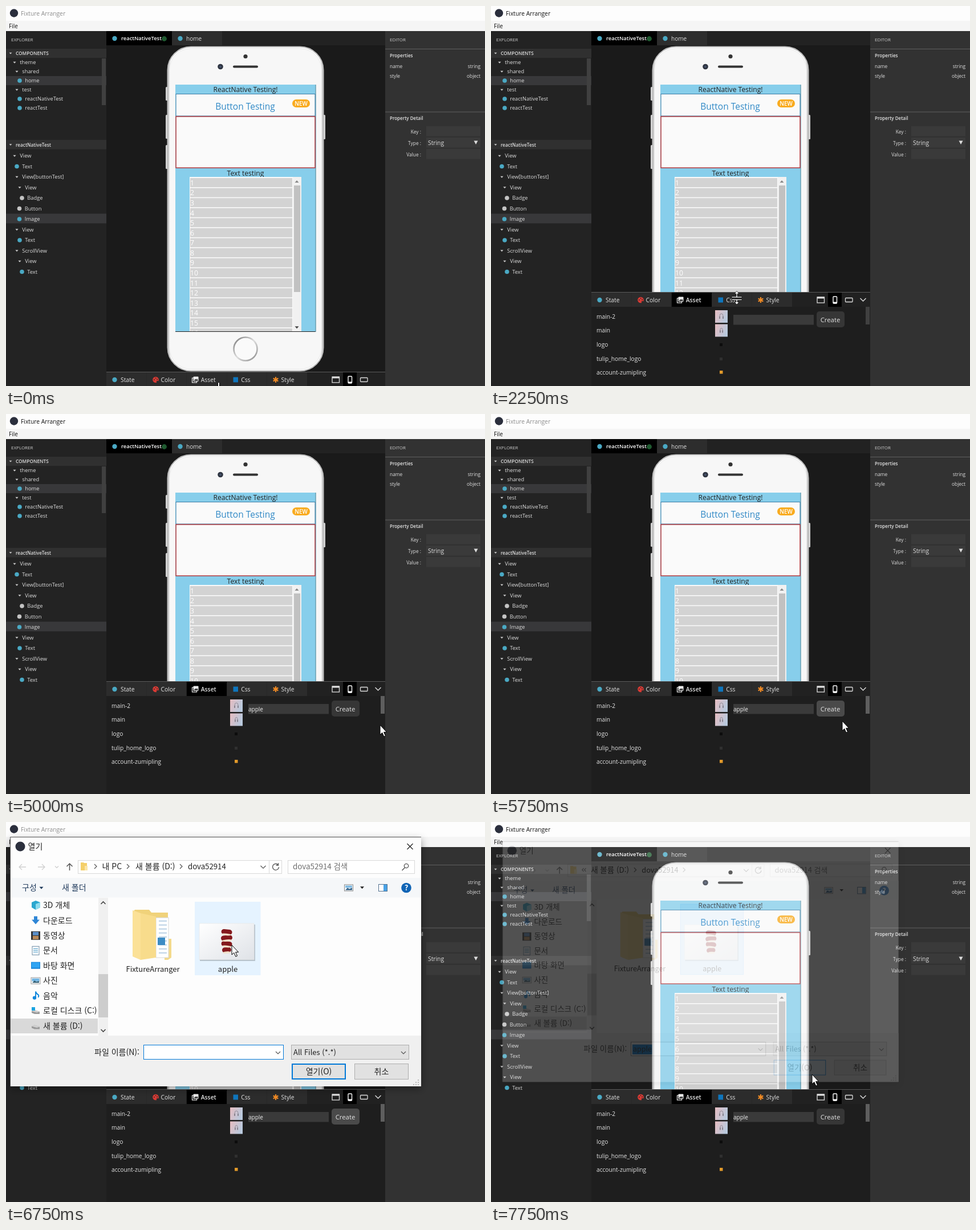
These frames come from a looping animation (840x667 px, 8000 ms). An HTML page:

```html
<!DOCTYPE html>
<html lang="ko">
<head>
<meta charset="utf-8">
<title>Fixture Arranger</title>
<style>
html, body { margin: 0; width: 100%; height: 100%; overflow: hidden; background: #1a1a1a; }
svg { display: block; width: 840px; height: 667px; font-family: "Open Sans", "Noto Sans", sans-serif; }
#dialog { font-family: "Noto Sans CJK KR", "Noto Sans CJK JP", "Noto Sans CJK", sans-serif; }
text { white-space: pre; }
</style>
</head>
<body>
<svg id="stage" viewBox="0 0 840 667"></svg>
<script>
const STEP = 250, STEPS = 32;

const rect = (x, y, w, h, fill, more = '') =>
  `<rect x="${x}" y="${y}" width="${w}" height="${h}" fill="${fill}" ${more}/>`;
const dot = (x, y, r, fill, more = '') => `<circle cx="${x}" cy="${y}" r="${r}" fill="${fill}" ${more}/>`;
const path = (d, fill, more = '') => `<path d="${d}" fill="${fill}" ${more}/>`;
const line = (d, stroke, w = 1, more = '') => path(d, 'none', `stroke="${stroke}" stroke-width="${w}" ${more}`);
// y is the optical middle of the line of text
const text = (x, y, s, size, fill = '#ddd', more = '') =>
  `<text x="${x}" y="${(y + size * .36).toFixed(1)}" font-size="${size}" fill="${fill}" ${more}>${s}</text>`;
const bold = 'font-weight="600"', mid = 'text-anchor="middle"', end = 'text-anchor="end"';
const group = (id, body, more = '') => `<g id="${id}" ${more}>${body}</g>`;
const down = (x, y, r, fill) => path(`M${x - r} ${y - r / 2}h${2 * r}l${-r} ${r * 1.15}z`, fill);
const chevron = (x, y, dx, dy, color = '#555', w = 1.2) => line(dx
  ? `M${x - dx / 2} ${y - Math.abs(dx)}l${dx} ${Math.abs(dx)}l${-dx} ${Math.abs(dx)}`
  : `M${x - Math.abs(dy)} ${y - dy / 2}l${Math.abs(dy)} ${dy}l${Math.abs(dy)} ${-dy}`, color, w);

const CYAN = '#4aa9c4';

// rows: [indent x of marker, label, marker colour or '' for an open branch]
const tree = (rows, y0, pitch) => rows.map(([x, label, mark], i) => {
  const y = y0 + i * pitch;
  return (mark ? dot(x, y, 3.8, mark) : down(x, y, 2.6, '#ccc')) + text(x + 9.3, y, label, 9.3);
}).join('');

function windowBars() {
  return rect(0, 0, 840, 27, '#fdfdfd') + rect(0, 26, 840, 18, '#f5f5f5') + dot(14, 12.5, 7.2, '#2b2f3d')
    + text(26, 13, 'Fixture Arranger', 10.3, '#111', 'id="title"') + text(5, 35, 'File', 10, '#111');
}

function explorer() {
  return rect(0, 44, 176, 623, '#232323') + text(9, 59, 'EXPLORER', 8, '#ccc')
    + rect(0, 75, 176, 16, '#303030') + down(8, 83, 2.4, '#ccc') + text(17, 83, 'COMPONENTS', 8.3, '#ddd', bold)
    + rect(0, 123, 176, 16, '#38383a') + rect(168, 92, 7, 82, '#404040')
    + tree([[15, 'theme'], [19, 'shared'], [24, 'home', CYAN], [19, 'test'],
      [24, 'reactNativeTest', CYAN], [24, 'reactTest', CYAN]], 99, 16)
    + rect(0, 235, 176, 16.5, '#303030') + down(8, 243.5, 2.4, '#ccc') + text(17, 243.5, 'reactNativeTest', 8.2, '#ddd', bold)
    + rect(0, 364.5, 176, 17, '#38383a')
    + tree([[15, 'View'], [19, 'Text', CYAN], [19, 'View[buttonTest]'], [24, 'View'], [28, 'Badge', '#c4c4c4'],
      [23.5, 'Button', '#c4c4c4'], [23.5, 'Image', CYAN], [19, 'View'], [24, 'Text', CYAN],
      [19, 'ScrollView'], [24, 'View'], [28, 'Text', CYAN]], 263, 18.5);
}

function editor() {
  const field = y => rect(737, y, 95, 17.5, '#3a3a3a');
  return rect(665, 44, 175, 623, '#323232') + text(673, 59, 'EDITOR', 8, '#ccc')
    + rect(665, 75, 175, 1, '#606060') + text(673, 87, 'Properties', 8.1, '#e4e4e4', bold)
    + text(673, 106, 'name', 8.4) + text(832, 106, 'string', 8.4, '#ddd', end)
    + text(673, 123, 'style', 8.4) + text(832, 123, 'object', 8.4, '#ddd', end)
    + rect(665, 185.5, 175, 1, '#606060') + text(673, 197.5, 'Property Detail', 8, '#e4e4e4', bold)
    + ['Key :', 'Type :', 'Value :'].map((s, i) =>
      text(728, 220.5 + i * 20, s, 8.4, '#ddd', end) + field(211 + i * 20)).join('')
    + text(740, 240, 'String', 10.3) + path('M820.5 236.5h7l-3.5 6.5z', '#ddd');
}

function phone() {
  const sideButton = (x, y, h) => rect(x, y, 4, h, '#d4d4d4', 'rx="1.5"');
  const rows = Array.from({ length: 16 }, (_, i) => {
    const y = 302 + i * 17.58;
    return rect(323, y, 179, 16, '#d3d3d3') + text(323, y + 8.4, i + 1, 12.2, '#fff');
  }).join('');
  return sideButton(280, 142, 24) + sideButton(280, 191, 42) + sideButton(280, 244, 42) + sideButton(556, 191, 43)
    + rect(283.5, 71.5, 273, 569, 'url(#shell)', 'rx="41" stroke="#bdbdbd" stroke-width="2"')
    + rect(286.5, 74.5, 267, 563, '#f7f7f7', 'rx="38" stroke="#e9e9e9"')
    + dot(420, 88.5, 3.6, '#333') + dot(376, 106.5, 4.8, '#2e3440') + dot(376, 106.5, 2, '#46536b')
    + rect(398, 104.5, 44, 4, '#333', 'rx="2"')
    + dot(420, 602, 20.5, '#fafafa', 'stroke="url(#ring)" stroke-width="2.5"')
    + rect(297, 138, 246.5, 434, '#87ceeb') + rect(297, 571, 246, 1, '#222') + rect(542.5, 138, 1, 434, '#5b8796')
    + text(420, 147, 'ReactNative Testing!', 12.1, '#222', mid)
    + rect(298, 154.5, 244, 38.5, '#fafafa', 'stroke="#3a7ca5"')
    + text(419.5, 176, 'Button Testing', 15.5, '#3089c6', mid)
    + rect(502, 164, 31, 14, '#f9ab1f', 'rx="7"') + text(517.5, 171, 'NEW', 9.8, '#fff', mid + ' ' + bold)
    + rect(298, 194, 244, 90, '#fafafa', 'stroke="#b33a3e" stroke-width="1.5"')
    + text(420, 293.5, 'Text testing', 12.2, '#222', mid)
    + `<g clip-path="url(#list)">${rect(322, 300, 181, 271, '#fafafa')}${rows}</g>`
    + rect(503, 300, 15, 271, '#f1f1f1') + rect(505, 315, 11, 187, '#c1c1c1')
    + path('M506.5 310l3.5-4 3.5 4z', '#888') + down(510, 564, 3.5, '#444');
}

function workspace() {
  return rect(176, 44, 489, 623, '#1a1a1a') + rect(176, 44, 489, 25, '#222')
    + phone()
    + rect(176, 44, 115, 25, '#000') + rect(291, 44, 88, 25, '#2d2d2d')
    + dot(190.5, 57, 4.2, CYAN) + text(202, 57, 'reactNativeTest', 9.4, '#fff', bold) + dot(277.5, 57.5, 4.4, '#1f5a30')
    + dot(305.5, 57, 4.2, CYAN) + text(316, 57, 'home', 10);
}

// Drawn with its top edge at y = 0
function panel() {
  const tabs = ['State', 'Color', 'Asset', 'Css', 'Style'].map((s, i) => {
    const x = 176 + i * 70.4;
    return rect(x, 0, 70.5, 25, '#2c2c2c', `id="tab${s}"`) + text(x + 25, 13, s, 10.3, '#e4e4e4', `id="label${s}"`);
  }).join('');
  const palette = dot(262.5, 13, 5.3, '#d93a34') + [[-2.5, 0], [0, -2.8], [2.7, -.5]].map(([x, y]) =>
    dot(262.5 + x, 13 + y, .9, '#2c2c2c')).join('') + dot(265.5, 16.5, 1.7, '#2c2c2c');
  const picture = rect(326.5, 10, 8, 8, 'none', 'stroke="#eee" stroke-width="1.2"') + rect(328.5, 7.5, 9, 8.5, '#eee', 'rx="1"')
    + path('M329.5 15l2.5-3.5 1.5 1.5 1.5-2 2 4z', '#333');
  const star = [0, 60, 120].map(a => line('M473 8v10', '#f08a24', 2.2, `transform="rotate(${a} 473 13)"`)).join('');
  const names = ['main-2', 'main', 'logo', 'tulip_home_logo', 'account-zumipling'].map((s, i) =>
    text(185, 42 + i * 24.65, s, 10.2, '#e4e4e4')).join('');
  const headphones = (y, r) => rect(393, y, 22, 22, 'url(#photo)')
    + line(`M${404 - r} ${y + 12}v-2a${r} ${r + 1} 0 0 1 ${2 * r} 0v2`, '#85808c', .8)
    + line(`M${404 - r} ${y + 11}v4m${2 * r} -4v4`, '#69646f', 1.3);
  return rect(176, 0, 489, 210, '#1e1e1e') + rect(176, 0, 489, 25, '#212121') + tabs
    + rect(176, -1, 489, 1, '#5a5a5a')
    + dot(190.5, 13, 4.2, CYAN) + palette + picture + rect(398.5, 8.5, 8.5, 9, '#0f76bd') + star
    + rect(591, 0, 24, 25, '#000')
    + rect(572, 8, 12.5, 10, 'none', 'stroke="#ddd" stroke-width="1.3"') + rect(572, 7.5, 12.5, 3, '#ddd')
    + rect(600, 7, 6.5, 12, 'none', 'rx="1" stroke="#fff" stroke-width="1.4"') + rect(600, 16.5, 6.5, 2.5, '#fff')
    + rect(621.5, 9.5, 12.5, 7, 'none', 'rx="1" stroke="#ddd" stroke-width="1.3"')
    + group('fold', line('M647.5 10l5 5 5-5', '#ddd', 1.4))
    + group('body', names + headphones(31, 3) + headphones(55.5, 2.1)
      + rect(401, 89, 5, 5, '#0c0c0c') + rect(401, 114, 5, 5, '#303030') + rect(401, 137, 5.5, 5.5, '#e29a2a')
      + rect(425, 39, 141, 17.5, '#3a3a3a') + text(425, 48.5, '', 10, '#eee', 'id="typed"')
      + rect(571, 33, 49, 28, '#363636', 'rx="5" id="create"') + text(595, 47.5, 'Create', 11.4, '#e4e4e4', mid)
      + rect(657, 25, 7, 31, '#404040', 'id="thumb"'));
}

function folder() {
  return path('M223 157l3-3h25l4 5h29v79h-58z', '#f0d27a') + path('M278 205h12v33l-6 4h-6z', '#f3d98b')
    + rect(263, 168, 22, 70, '#fff', 'stroke="#d8d8d8"')
    + Array.from({ length: 9 }, (_, i) => rect(268, 173 + i * 7, 14, 1.5, '#a8c4dd')).join('')
    + rect(266, 203, 13, 13, '#3d8cc4')
    + path('M222 155l14 5v82l-14-6z', '#fbe197') + path('M236 160l27 6v72l-27 4z', '#f8dc8c');
}

function applePhoto() {
  const slice = (y, rx, tilt) => `<g transform="rotate(${tilt} 387 ${y})">${
    rect(387 - rx, y - 5, 2 * rx, 9, '#84191d', 'rx="4.5"')}<ellipse cx="387" cy="${y + 4}" rx="${rx - 1}" ry="1.8" fill="#f0dfc8"/></g>`;
  return rect(340, 180, 97, 64, '#000', 'opacity=".2"')
    + rect(339, 178, 96, 63.5, 'url(#paper)', 'stroke="#e4e4e4" stroke-width=".7"')
    + slice(225, 8, -4) + slice(214.5, 9.5, 5) + slice(204, 10, -5) + slice(193.5, 9.5, 6);
}

function placeIcon(i, y) {
  const x = 52, drive = path(`M${x - 7} ${y + 1}l5-2 9 3v4l-9 0-5-2z`, '#9a9a9a') + path(`M${x - 7} ${y + 1}l5-2 9 3-5 1.5z`, '#d0d0d0');
  return [
    () => path(`M${x - 7} ${y - 5}l7-3 8 3v9l-8 4-7-4z`, '#2ba7cf') + path(`M${x} ${y - 2}l8-3v9l-8 4z`, '#8fdcee'),
    () => path(`M${x - 3} ${y - 7}h6v6h4l-7 8-7-8h4z`, '#2e86d6'),
    () => rect(x - 8, y - 7, 16, 15, '#333') + rect(x - 5, y - 6, 10, 6, '#5b8fc9') + rect(x - 5, y + 1, 10, 6, '#b98a5a'),
    () => rect(x - 6, y - 7, 12, 15, '#fff', 'stroke="#6c8ba3"') + line(`M${x - 4} ${y - 3}h8m-8 3h8m-8 3h8`, '#3c93c4'),
    () => rect(x - 8, y - 6, 16, 12, '#1583d8') + rect(x - 7, y - 5, 14, 9, '#2fa4f2'),
    () => rect(x - 8, y - 5, 16, 11, '#fff', 'stroke="#999"') + rect(x - 6.5, y - 3.5, 13, 5, '#70b4e2') + path(`M${x - 6} ${y + 4}l4-4 3 2 5-1v3z`, '#315f76'),
    () => dot(x - 2, y + 4, 3.2, '#1287dc') + line(`M${x} ${y + 4}v-11q1 4 5 6q1 3-1 4`, '#1287dc', 1.9),
    () => drive + rect(x - 7, y - 6, 6, 6, '#1ba4e0'),
    () => drive,
  ][i]();
}

function dialog() {
  const ink = '#222';
  const places = ['3D 개체', '다운로드', '동영상', '문서', '바탕 화면', '사진', '음악', '로컬 디스크 (C:)', '새 볼륨 (D:)'];
  const sidebar = places.map((s, i) => placeIcon(i, 146 + i * 26.43) + text(65, 146 + i * 26.43, s, 14, ink)).join('');
  const crumbs = (id, parts, seps) => group(id,
    parts.map(([x, s]) => text(x, 78, s, s[0] === 'd' ? 13.2 : 14, ink)).join('') + seps.map(x => chevron(x, 78, 4, 0)).join(''));
  const grip = [[0, 0], [4, 0], [4, -4], [0, 4], [4, 4], [-4, 4]].map(([x, y]) => rect(718 + x, 456 + y, 2, 2, '#b8b8b8')).join('');
  return rect(8, 27, 720, 437, '#fdfdfd', 'filter="url(#shadow)"') + line('M7.5 464V26.5H728', '#555')
    + dot(25, 43, 8.5, '#2b2f3d') + text(38.5, 43, '열기', 14, ink) + line('M703.5 38l10 10m0-10l-10 10', '#222', 1.2)
    + line('M35 79H23m5-5l-5 5 5 5M56 79h12m-5-5l5 5-5 5', '#d0d0d0', 1.3) + chevron(89, 79, 0, 3, '#ccc')
    + line('M111.5 85V73m-5 5l5-5 5 5', '#555', 1.5)
    + rect(126.5, 67.5, 357, 23, '#fff', 'stroke="#d9d9d9"') + line('M461.5 68v22', '#d9d9d9')
    + path('M131 71h5l1 1h5v13h-11z', '#f4cf6a') + path('M138 77h5v8h-5z', '#fbe6a6')
    + crumbs('pathFull', [[168.5, '내 PC'], [227, '새 볼륨 (D:)'], [319, 'dova52914']], [157, 214, 307])
    + crumbs('pathShort', [[168.5, '새 볼륨 (D:)'], [261, 'dova52914']], [249, 338])
    + group('pathMore', chevron(154, 78, -3, 0) + chevron(158, 78, -3, 0))
    + chevron(451, 79, 0, 4.5) + line('M477 75a5.5 5.5 0 1 0 1.5 4m-1-7v4h-4', '#555', 1.3)
    + rect(494.5, 67.5, 222, 23, '#fff', 'stroke="#d9d9d9"') + text(503, 78.5, 'dova52914 검색', 13.4, '#6d6d6d')
    + dot(702, 77, 3.7, 'none', 'stroke="#555" stroke-width="1.3"') + line('M699.5 80l-5 5', '#555', 1.5)
    + rect(8, 98, 720, 34.5, '#f5f7f9') + text(28, 115, '구성', 14, '#1e395b') + down(62, 115.5, 3.5, '#1e395b')
    + text(98, 115, '새 폴더', 14, '#1e395b')
    + rect(593.5, 110, 15, 11, '#fff', 'stroke="#888"') + rect(595, 111.5, 12, 4, '#7fb9e2') + path('M595 119.5l4-4 3 2 5-2v4z', '#2f5f86')
    + down(624.5, 115, 3.5, '#222') + rect(653.5, 109.5, 15, 12, '#fff', 'stroke="#52718f"') + rect(662, 110, 6, 11, '#4aa2e6')
    + dot(702, 115.5, 8.8, '#1064b5') + text(702, 115.5, '?', 13, '#fff', mid + ' ' + bold)
    + rect(8, 345, 153, 26, '#d9d9d9') + sidebar
    + rect(162, 133, 17, 242, '#f0f0f0') + rect(162, 267, 17, 76, '#cdcdcd')
    + chevron(170.5, 142, 0, -4, '#444', 1.6) + chevron(170.5, 366, 0, 4, '#444', 1.6)
    + folder() + text(257.5, 258, 'FixtureArranger', 13, ink, mid)
    + rect(331.5, 140.5, 114.5, 128, '#cce8ff', 'stroke="#99d1ff" id="pick"')
    + applePhoto() + text(389, 258, 'apple', 13, ink, mid)
    + rect(8, 375, 720, 89, '#f0f0f0')
    + text(234, 404, '파일 이름(N):', 14, ink, end)
    + rect(241.5, 391.5, 245, 25, '#fff', 'id="nameBox"') + chevron(477, 405, 0, 4, '#555')
    + rect(245, 396, 1, 17, '#000', 'id="caret"') + rect(244, 396, 36, 18, '#0078d7', 'id="nameMark"')
    + text(245, 404.5, 'apple', 13, ink, 'id="fileName"')
    + rect(500.5, 391.5, 206, 25, '#e1e1e1', 'stroke="#adadad" id="filter"') + text(504, 404.5, 'All Files (*.*)', 13, ink)
    + chevron(697, 405, 0, 4, '#555')
    + rect(501, 424, 95, 28, '#0078d7') + group('openPlain', rect(503, 426, 91, 24, '#e1e1e1'))
    + group('openHover', rect(502, 425, 93, 26, '#e5f1fb')) + text(548.5, 438, '열기(O)', 14, ink, mid)
    + rect(611.5, 424.5, 94, 27, '#e1e1e1', 'stroke="#adadad"') + text(658.5, 438, '취소', 14, ink, mid) + grip;
}

function cursors() {
  const edge = 'stroke="#000" stroke-width="1" stroke-linejoin="round"';
  return group('arrow', path('M1 1V18l3.8-3.6 3 6.8 2.7-1.2-2.9-6.6h5z', '#fff', edge))
    + group('hand', path('M-1.5 1.5q1.5-2 3 0V7l7 1.5q2 1 1.5 4L9 18H0l-5-7q0-2 3.5 0z', '#fff', edge))
    + group('beam', line('M-3-9q3 0 3 2V7q0 2-3 2m6 0q-3 0-3-2V-7q0-2 3-2', '#ddd', 1.2))
    + group('resize', path('M0-11.5l4 4.5H1v5h8v2H-9v-2H-1V-7h-3zM0 12l4-4.5H1v-3h8v-2H-9v2H-1v3h-3z', '#fff', 'stroke="#000" stroke-width=".7"'));
}

const stop = (o, c) => `<stop offset="${o}" stop-color="${c}"/>`;
const defs = `<defs>
<linearGradient id="shell">${stop(0, '#b5b5b5')}${stop(.02, '#fff')}${stop(.98, '#fff')}${stop(1, '#b5b5b5')}</linearGradient>
<linearGradient id="ring" x2="1" y2="1">${stop(0, '#777')}${stop(.5, '#ddd')}${stop(1, '#888')}</linearGradient>
<linearGradient id="photo" x2="1" y2=".4">${stop(0, '#e6bcc0')}${stop(1, '#b9c9dd')}</linearGradient>
<linearGradient id="paper" x2="1" y2="1">${stop(0, '#fff')}${stop(1, '#dfe2e7')}</linearGradient>
<clipPath id="list"><rect x="322" y="300" width="181" height="271"/></clipPath>
<filter id="shadow" x="-10%" y="-10%" width="120%" height="125%"><feDropShadow dx="0" dy="4" stdDeviation="7" flood-opacity=".4"/></filter>
</defs>`;

const $ = id => document.getElementById(id);
$('stage').innerHTML = defs + workspace() + group('panel', panel()) + explorer() + editor() + windowBars()
  + group('dialog', dialog()) + cursors();

// [first step, value]; each value holds until the next one
const POINTER = [
  [0, 'hand', 373, 660], [1, 'hand', 352, 652], [3, 'arrow', 395, 615], [4, 'resize', 431, 586], [6, 'resize', 431, 589],
  [8, 'resize', 431, 556], [9, 'resize', 431, 512], [10, 'resize', 431, 479], [11, 'arrow', 656, 545], [12, 'beam', 470, 507],
  [13, 'arrow', 640, 535], [14, 'arrow', 692, 563], [20, 'arrow', 655, 545], [21, 'arrow', 605, 522], [22, 'arrow', 607, 525],
  [23, 'arrow', 615, 538], [24, 'arrow', 616, 563], [25, 'arrow', 560, 470], [26, 'arrow', 440, 260], [27, 'arrow', 395, 215],
  [29, 'arrow', 540, 405], [30, 'arrow', 545, 439], [31, 'arrow', 562, 442]];
const PANEL_TOP = [[0, 643], [2, 580], [8, 547], [9, 503], [10, 470]];
const TYPED = [[0, ''], [16, 'a'], [17, 'app'], [18, 'apple']];
const at = (track, k) => track.filter(e => e[0] <= k).pop().slice(1);

const set = (id, attrs) => { for (const a in attrs) $(id).setAttribute(a, attrs[a]); };
const show = (id, on) => set(id, { display: on ? 'inline' : 'none' });

function render(ms) {
  const k = Math.floor(ms / STEP) % STEPS;
  const [top] = at(PANEL_TOP, k), opened = top < 643;
  const chosen = k >= 28, overOpen = k >= 30, closing = k === 31;

  set('title', { fill: k === 0 || (k >= 22 && !closing) ? '#8c8c8c' : '#111' });
  set('panel', { transform: `translate(0 ${top})` });
  set('tabAsset', { fill: opened ? '#000' : '#2c2c2c' });
  set('labelAsset', { 'font-weight': opened ? 600 : 400 });
  show('fold', opened);
  show('body', opened);
  $('typed').textContent = at(TYPED, k)[0];
  set('thumb', { fill: k >= 20 ? '#5e5e5e' : '#404040' });
  set('create', { fill: k >= 21 && !closing ? '#4a4a4a' : '#363636' });

  show('dialog', k >= 24);
  set('dialog', {
    opacity: closing ? .21 : 1,
    transform: closing ? 'translate(367 245) scale(.964) translate(-367.5 -245)' : '',
  });
  show('pathFull', !chosen);
  show('pathShort', chosen);
  show('pathMore', chosen);
  show('pick', k >= 27);
  set('pick', { fill: chosen ? '#cce8ff' : '#e5f3ff', stroke: chosen ? '#99d1ff' : '#e5f3ff' });
  set('nameBox', { stroke: chosen ? '#7a7a7a' : '#0078d7' });
  show('caret', k >= 24 && k <= 26);
  show('fileName', chosen);
  show('nameMark', closing);
  set('filter', { fill: k === 29 ? '#e5f1fb' : k === 30 ? '#dde2e8' : '#e1e1e1' });
  show('openPlain', !overOpen);
  show('openHover', overOpen);

  const [kind, x, y] = at(POINTER, k);
  for (const c of ['arrow', 'hand', 'beam', 'resize']) show(c, c === kind);
  set(kind, { transform: `translate(${x} ${y})` });
}

const start = performance.now();
function tick() {
  render(performance.now() - start);
  requestAnimationFrame(tick);
}
tick();
</script>
</body>
</html>
```
